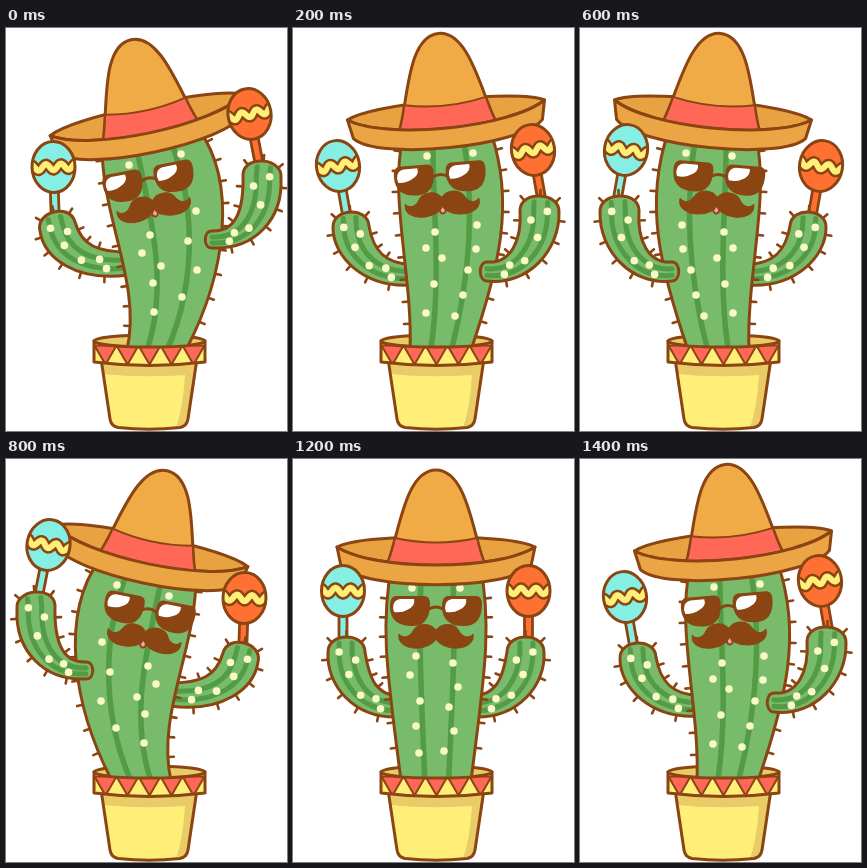
Recreate the animation shown at these times as an HTML page. Size 281 by 403 pixels, loop 1.6 s.

```html
<!DOCTYPE html>
<html lang="en">
<head>
<meta charset="utf-8">
<title>Dancing cactus</title>
<style>
  html, body { margin: 0; width: 100%; height: 100%; overflow: hidden; background: #fff; }
  svg { display: block; width: 281px; height: 403px; }
</style>
</head>
<body>
<svg id="stage" viewBox="0 0 281 403" stroke-linejoin="round" stroke-linecap="round"></svg>
<script>
const BROWN = '#8b4513', GREEN = '#78bc6b', STRIPE = '#539b45', DOT = '#fbf8c8';
const YELLOW = '#ffef78', SHADE = '#e9cb68', RED = '#ff6757';
const TEAL = '#84efe2', ORANGE = '#ff7133';
const STEP = 200;
const SWAY = [2, 1, 0, -1, -2, -1, 0, 1];

// Edges are cubics: body runs top to bottom, arms run tip to base.
const POSES = [
  {
    left: [99,105, 86,170, 96,225, 108,322],
    right: [187,105, 200,170, 190,225, 178,322],
    arms: [
      { in: [72,193, 76,218, 82,236, 106,237], out: [35,193, 33,225, 60,260, 106,258] },
      { in: [214,193, 210,218, 204,236, 180,237], out: [251,193, 253,225, 226,260, 180,258] }
    ],
    maracas: [[50,132,0], [235.5,132,0]],
    hat: [0,0,0], face: [0,0,0],
    dots: [119,129, 167,129, 123,197, 117,216, 160,204, 165,228, 127,242, 156,248, 161,272, 123,267, 126,294, 151,292]
  },
  {
    left: [110,108, 96,170, 120,250, 117,322],
    right: [198,105, 222,175, 206,240, 178,322],
    arms: [
      { in: [76,198, 80,222, 92,236, 118,236], out: [40,200, 40,228, 70,260, 118,257] },
      { in: [227,182, 229,212, 218,236, 194,234], out: [266,184, 267,222, 235,258, 194,253], front: true }
    ],
    maracas: [[45,138,-10], [240,122,-10]],
    hat: [10,-6,-5.8], face: [4,-1.5,-4.7],
    dots: [134,128, 180,125, 184,197, 142,204, 183,221, 149,230, 133,220, 175,242, 141,256, 170,267, 133,285, 162,288]
  },
  {
    left: [96,115, 95,190, 136,255, 121,322],
    right: [192,100, 232,155, 220,245, 180,322],
    arms: [
      { in: [69,194, 76,218, 92,224, 122,224], out: [34,203, 38,230, 70,254, 122,247] },
      { in: [237,146, 238,182, 230,204, 206,203], out: [275,150, 277,192, 248,222, 206,220], front: true }
    ],
    maracas: [[47.5,139,-2], [243.5,86,-11]],
    hat: [-2,-1,-12], face: [-.5,2,-11],
    dots: [123,137, 175,126, 190,183, 182,213, 144,207, 136,225, 155,238, 191,242, 147,255, 176,269, 148,284]
  }
];
const ARM_DOTS = [[0,.7], [.1,.28], [.27,.55], [.56,.6], [.72,.38], [.83,.7]];

const path = (d, fill = 'none', stroke = BROWN, w = 3) =>
  `<path d="${d}" fill="${fill}" stroke="${stroke}" stroke-width="${w}"/>`;
const group = (transform, body) => `<g transform="${transform}">${body}</g>`;
const mix = (a, b, u) => a.map((v, i) => v + (b[i] - v) * u);
const curve = c => `M${c[0]} ${c[1]}C${c.slice(2)}`;
const back = c => [c[6], c[7], c[4], c[5], c[2], c[3], c[0], c[1]];
const dot = (x, y) => `<circle cx="${x}" cy="${y}" r="3.8" fill="${DOT}"/>`;

function at(c, t) {
  const s = 1 - t;
  const p = k => s*s*s*c[k] + 3*s*s*t*c[k+2] + 3*s*t*t*c[k+4] + t*t*t*c[k+6];
  const d = k => s*s*(c[k+2]-c[k]) + 2*s*t*(c[k+4]-c[k+2]) + t*t*(c[k+6]-c[k+4]);
  const dx = d(0), dy = d(1), len = Math.hypot(dx, dy);
  return { x: p(0), y: p(1), nx: -dy / len, ny: dx / len };
}

function spikes(c, side, count, from, to) {
  let d = '';
  for (let i = 0; i < count; i++) {
    const p = at(c, from + (to - from) * i / (count - 1));
    d += `M${p.x} ${p.y}l${p.nx * side * 6} ${p.ny * side * 6}`;
  }
  return path(d, 'none', BROWN, 2.6);
}

function arm(a, side) {
  const i = a.in, o = a.out;
  const dx = i[0] - o[0], dy = i[1] - o[1], k = 20 * side / Math.hypot(dx, dy);
  const ux = dy * k, uy = -dx * k;
  const cap = [o[0], o[1], o[0]+ux, o[1]+uy, i[0]+ux, i[1]+uy, i[0], i[1]];
  const bulge = 9 * side;
  const shape = curve(i) + `C${i[6]+bulge} ${i[7]} ${o[6]+bulge} ${o[7]} ${o[6]} ${o[7]}` +
    `C${back(o).slice(2)}C${cap.slice(2)}Z`;
  const stripe = u => {
    const c = mix(i, o, u);
    return path(`M${c[0] + ux * .45} ${c[1] + uy * .45}L${c[0]} ${c[1]}C${c.slice(2)}`, 'none', STRIPE, 5);
  };
  return spikes(o, side, 5, .08, .84) + spikes(i, -side, 3, .12, .6) + spikes(cap, -side, 3, .2, .8) +
    path(shape, GREEN, 'none') + stripe(.35) + stripe(.7) +
    ARM_DOTS.map(([t, u]) => { const p = at(mix(i, o, u), t); return dot(p.x, p.y); }).join('') +
    path(shape);
}

function body(p) {
  const shape = curve(p.left) + `L${p.right[6]} ${p.right[7]}C${back(p.right).slice(2)}Z`;
  let dots = '';
  for (let i = 0; i < p.dots.length; i += 2) dots += dot(p.dots[i], p.dots[i + 1]);
  return spikes(p.left, 1, 9, .08, .88) + spikes(p.right, -1, 9, .08, .88) +
    path(shape, GREEN, 'none') +
    [.34, .68].map(u => path(curve(mix(p.left, p.right, u)), 'none', STRIPE, 5.5)).join('') +
    dots + path(shape);
}

function hat() {
  const rim = 'C206 112 80 112 44 88';
  const bottom = 'C160 107 126 107 95 103Z';
  return path('M44 88C60 80 100 78 143 78C186 78 226 80 242 88' + rim + 'Z', '#e9a242') +
    path('M95 103C106 75 112 11 143 11C174 11 180 75 191 103' + bottom, '#f0ab46') +
    path('M95 103Q99 93 102 79Q143 88 184 79Q187 93 191 103' + bottom, RED, BROWN, 2) +
    path('M242 88L238 107C215 132 71 132 48 107L44 88C80 112 206 112 242 88Z', '#eba544');
}

function face(mouth) {
  const lens = x => group(`translate(${x} 0)`,
    path('M6 138.5H34Q38.5 138.5 38.5 145C38.5 159 33 165.5 22 165.5C8 165.5 1.5 160 1.5 147Q1.5 139 6 138.5Z', BROWN) +
    path('M3 149Q3 141 10 140H24Q26 147 17 151Q12 154 4 153Z', '#fff', 'none'));
  const half = 'M143 171C137 163 124 164 120 172C117 178 110 180 106 175C104 185 115 190 126 189C135 188 141 184 143 180Z';
  return path('M136 150Q143 146 150 150') + lens(97) + lens(149) +
    (mouth ? `<ellipse cx="143" cy="183" rx="3" ry="4.2" fill="#ff9fae" stroke="${BROWN}" stroke-width="2"/>` : '') +
    path(half, BROWN, BROWN, 1) + group('translate(286 0) scale(-1 1)', path(half, BROWN, BROWN, 1));
}

const hold = ([x, y, r]) => `translate(${x} ${y}) rotate(${r})`;
const pin = ([x, y, r], cy) => `translate(${x} ${y}) rotate(${r} 143 ${cy})`;

function stick(m, color) {
  return group(hold(m), path('M-4 20V56H4V20Z', color, BROWN, 2.8));
}

function shaker(m, color) {
  let wave = 'M-30 0';
  for (let x = -29; x <= 30; x++) wave += `L${x} ${(3.2 * Math.cos(x * Math.PI * 2 / 15)).toFixed(2)}`;
  const oval = (fill, stroke) =>
    `<ellipse rx="21.5" ry="25.5" fill="${fill}" stroke="${stroke}" stroke-width="3"/>`;
  return group(hold(m), oval(color, 'none') +
    `<g clip-path="url(#oval)">${path(wave, 'none', BROWN, 11)}${path(wave, 'none', YELLOW, 6)}</g>` +
    oval('none', BROWN));
}

function figure(sway) {
  const p = POSES[Math.abs(sway)], flip = sway < 0;
  const colors = flip ? [ORANGE, TEAL] : [TEAL, ORANGE];
  const mirror = flip ? 'translate(286 0) scale(-1 1)' : '';
  const arms = front => p.arms.map((a, i) => !!a.front === front ? arm(a, i ? -1 : 1) : '').join('');
  const both = draw => p.maracas.map((m, i) => draw(m, colors[i])).join('');
  // The face is flipped back so the glint stays on the same side.
  return `<g class="pose" data-sway="${sway}" visibility="hidden">` + group(mirror,
    both(stick) + arms(false) + body(p) + arms(true) +
    group(pin(p.face, 150), group(mirror, face(sway !== 0))) +
    group(pin(p.hat, 88), hat()) + both(shaker)) + '</g>';
}

function potBack() {
  return `<ellipse cx="143.5" cy="313" rx="55.5" ry="6" fill="${SHADE}" stroke="${BROWN}" stroke-width="3"/>`;
}

function potFront() {
  const pot = 'M95.5 334L104 391Q105 398 112 399.5Q143 403 174 399.5Q181 398 182 391L190.5 334Z';
  const band = 'M88 313Q90 319 143.5 319Q197 319 199 313V334Q143.5 341 88 334Z';
  let teeth = '';
  for (let i = 0; i < 5; i++) {
    const x = 88.5 + i * 22;
    teeth += `M${x} 317.5L${x + 11} 336.5L${x + 22} 317.5Z`;
  }
  return path(pot, YELLOW, 'none') +
    path('M96 336H190L182 391Q181 398 170 400Q177 380 179 347Q135 350 97 346Z', SHADE, 'none') + path(pot) +
    path(band, YELLOW, 'none') + `<g clip-path="url(#band)">${path(teeth, RED, BROWN, 2)}</g>` + path(band) +
    `<clipPath id="band"><path d="${band}"/></clipPath>`;
}

const stage = document.getElementById('stage');
stage.innerHTML = '<clipPath id="oval"><ellipse rx="21.5" ry="25.5"/></clipPath>' +
  potBack() + [-2, -1, 0, 1, 2].map(figure).join('') + potFront();

const poses = [...stage.querySelectorAll('.pose')];
const start = performance.now();
let shown = null;

function tick() {
  const sway = SWAY[Math.floor((performance.now() - start) / STEP) % SWAY.length];
  if (sway !== shown) {
    shown = sway;
    for (const g of poses) g.setAttribute('visibility', +g.dataset.sway === sway ? 'visible' : 'hidden');
  }
  requestAnimationFrame(tick);
}
tick();
</script>
</body>
</html>
```
